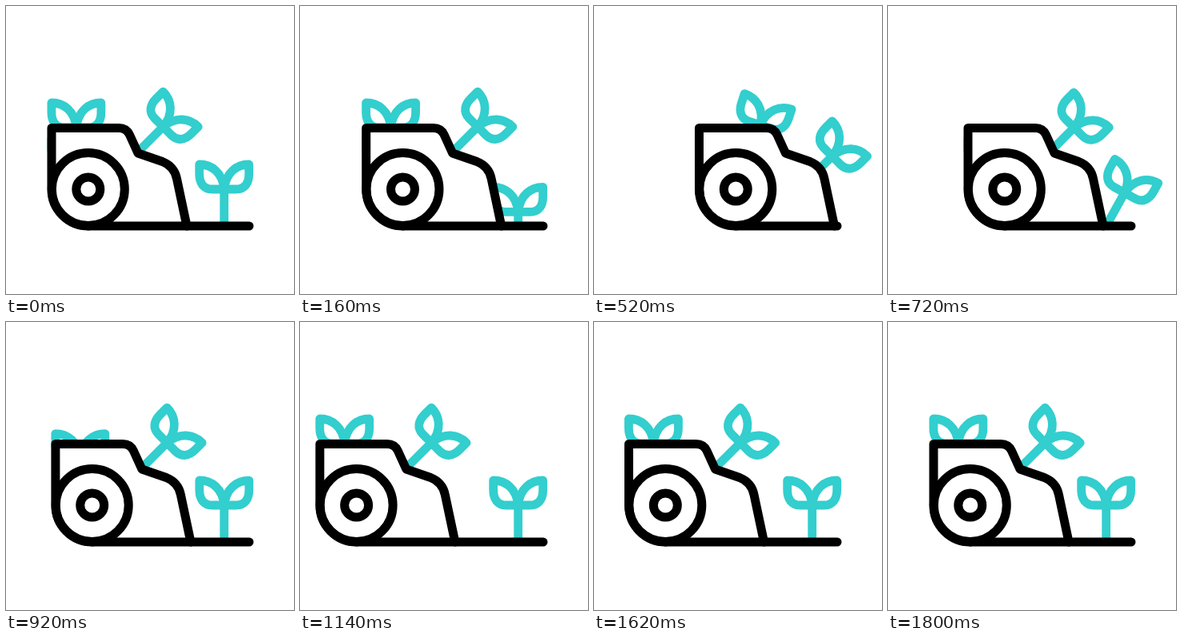
An HTML page for the animation above (2.4 s loop, 360 by 360 pixels).

```html
<!DOCTYPE html>
<html lang="en">
<head>
<meta charset="utf-8">
<title>Planting machine</title>
<style>
  html, body { margin: 0; width: 100%; height: 100%; overflow: hidden; background: #fff; }
  svg { display: block; width: 100vw; height: 100vh; }
  .line { fill: none; stroke: #000; stroke-width: 11; stroke-linecap: round; stroke-linejoin: round; }
  .body { fill: #fff; }
  .plant { fill: none; stroke: #33cece; stroke-width: 10.8; stroke-linecap: round; stroke-linejoin: round; }
</style>
</head>
<body>
<svg viewBox="0 0 360 360">
  <defs>
    <clipPath id="soil"><rect width="360" height="275"/></clipPath>
    <path id="leaf" d="M0-41H-15C-26-41-31-49-31-60V-72C-16-72-2-62 0-41"/>
    <g id="sprout">
      <path d="M0 0V-41"/>
      <use href="#leaf"/>
      <use href="#leaf" transform="scale(-1 1)"/>
    </g>
  </defs>
  <g class="plant" clip-path="url(#soil)">
    <use id="sinking" href="#sprout"/>
    <use id="planted" href="#sprout"/>
    <use id="advancing" href="#sprout"/>
    <use id="fresh" href="#sprout"/>
  </g>
  <g id="car" class="line">
    <path class="body" d="M103 275A46 46 0 0 1 57 229V152.5H141Q150.5 152.5 154.5 161L165 184L195.5 194.5Q210.5 200.5 213.5 216L226 275"/>
    <circle cx="102.8" cy="229" r="45.5"/>
    <circle cx="102.8" cy="229" r="15"/>
  </g>
  <path id="ground" class="line"/>
</svg>
<script>
const LOOP = 2400;
const RIGHT = 76, LEFT = -45;
const GROUND_X = 272.7, GROUND_Y = 270;
const REAR_X = 87.9, HOOD_X = 167.4;
const el = id => document.getElementById(id);
const lerp = (a, b, p) => a + (b - a) * p;
const progress = (t, from, to) => Math.min(1, Math.max(0, (t - from) / (to - from)));

function smooth(t, from, to) {
  const p = progress(t, from, to);
  return p * p * (3 - 2 * p);
}

// Cubic easing with flat ends; x1 and x2 set how quickly it leaves and settles.
function ease(p, x1, x2) {
  let lo = 0, hi = 1;
  for (let i = 0; i < 24; i++) {
    const s = (lo + hi) / 2, r = 1 - s;
    if (3 * s * r * r * x1 + 3 * s * s * r * x2 + s * s * s < p) lo = s;
    else hi = s;
  }
  return lo * lo * (3 - 2 * lo);
}

const driveOut = t => ease(progress(t, 0, 480), 0.25, 0.6);

function carX(t) {
  if (t < 490) return RIGHT * driveOut(t);
  if (t < 1290) return lerp(RIGHT, LEFT, ease(progress(t, 490, 1290), 0.167, 0.75));
  return lerp(LEFT, 0, ease(progress(t, 1290, 1785), 0.167, 0.833));
}

function place(id, x, y, angle = 0) {
  el(id).setAttribute("transform", `translate(${x} ${y}) rotate(${angle})`);
}

const DROP_START = 350, DROP_END = 740;
const dropReach = GROUND_X - HOOD_X - carX(DROP_END);

function render(t) {
  const car = carX(t);
  const drop = smooth(t, DROP_START, DROP_END);
  const shift = smooth(t, 290, 815);

  el("car").setAttribute("transform", `translate(${car} 0)`);
  el("ground").setAttribute("d", `M${103 + car} 275H304`);

  place("sinking", GROUND_X, GROUND_Y + 84 * driveOut(t));
  place("planted",
    t < DROP_END ? car + HOOD_X + dropReach * drop : GROUND_X,
    lerp(180, GROUND_Y, drop),
    45 * (1 - smooth(t, 580, 930)));
  place("advancing", car + lerp(REAR_X, HOOD_X, shift), lerp(193, 180, shift), 45 * drop);
  place("fresh", car + REAR_X, 193 + 45 * (1 - smooth(t, 720, 1080)));
}

const start = performance.now();
function tick() {
  render((performance.now() - start) % LOOP);
  requestAnimationFrame(tick);
}
tick();
</script>
</body>
</html>
```
